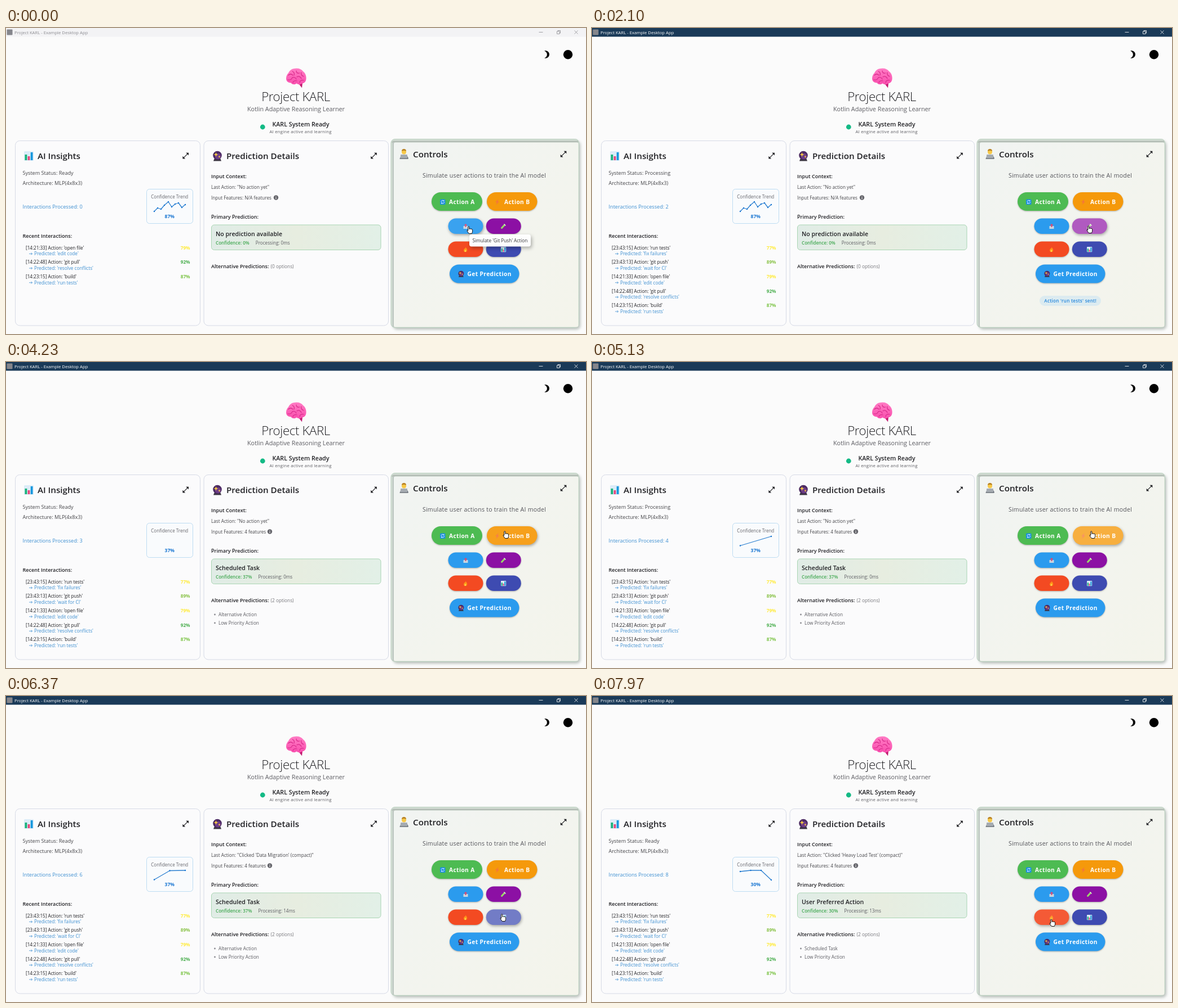
Recreate the animation shown at these times as an HTML page. Size 1029 by 544 pixels, loop 8000 ms.

```html
<!DOCTYPE html>
<html lang="en">
<head>
<meta charset="utf-8">
<title>Project KARL</title>
<style>
html, body { margin: 0; width: 100%; height: 100%; overflow: hidden; background: #fbfbfb; }
svg { display: block; width: 100vw; height: 100vh; }
text { font-family: "Open Sans", "Noto Sans", sans-serif; white-space: pre; }
</style>
</head>
<body>
<svg id="stage" viewBox="0 0 1029 544">
  <defs>
    <linearGradient id="predictionFill">
      <stop offset="0" stop-color="#e0ece6"/><stop offset=".5" stop-color="#e7ede0"/><stop offset="1" stop-color="#e2f0e7"/>
    </linearGradient>
    <linearGradient id="controlsFill" x2="1" y2="1">
      <stop offset="0" stop-color="#f1f4f2"/><stop offset="1" stop-color="#f4f4eb"/>
    </linearGradient>
    <linearGradient id="brainFill" x2="0" y2="1">
      <stop offset="0" stop-color="#ff7cc4"/><stop offset="1" stop-color="#f94fae"/>
    </linearGradient>
    <filter id="soft" x="-10%" y="-10%" width="120%" height="120%"><feGaussianBlur stdDeviation="2.5"/></filter>
    <path id="expand" transform="scale(.59) translate(-12 -12)" d="M21 11V3h-8l3.29 3.29-10 10L3 13v8h8l-3.29-3.29 10-10z"/>
    <g id="chart">
      <rect width="17" height="17" rx="1.5" fill="#dcecf8"/>
      <rect x="1.5" y="6" width="3.8" height="10" fill="#18b27a"/>
      <rect x="6.6" y="9" width="3.8" height="7" fill="#e5487d"/>
      <rect x="11.7" y="2" width="3.8" height="14" fill="#1497dd"/>
    </g>
    <g id="orb">
      <path d="M3 14h11l1.5 4h-14z" fill="#3a3440"/>
      <circle cx="8.5" cy="8" r="7.8" fill="#4b2a63"/>
      <circle cx="9.5" cy="9.5" r="5.2" fill="#6d3c86"/>
      <path d="M6 2.500l1 3 3 1-3 1-1 3-1-3-3-1 3-1zM12 8l.6 1.700 1.700.6-1.700.6-.6 1.700-.6-1.700-1.700-.6 1.700-.6z" fill="#ffd33d"/>
    </g>
  </defs>
</svg>
<script>
const LOOP = 8000;
const stage = document.getElementById('stage');

function add(tag, attrs, parent = stage) {
  const node = document.createElementNS('http://www.w3.org/2000/svg', tag);
  for (const key in attrs) node.setAttribute(key, attrs[key]);
  return parent.appendChild(node);
}
function label(x, y, content, size, fill = '#454549', weight = 400, extra = {}, parent = stage) {
  const node = add('text', { x, y, 'font-size': size, fill, 'font-weight': weight, ...extra }, parent);
  node.textContent = content;
  return node;
}
const box = (x, y, width, height, rx, fill, extra = {}, parent = stage) =>
  add('rect', { x, y, width, height, rx, fill, ...extra }, parent);
const path = (d, fill, extra = {}, parent = stage) => add('path', { d, fill, ...extra }, parent);
const use = (id, x, y, scale = 1, parent = stage) =>
  add('use', { href: '#' + id, transform: `translate(${x} ${y}) scale(${scale})` }, parent);
const span = (parent, dx, fill, weight) => add('tspan', { dx, fill, 'font-weight': weight }, parent);
const set = (node, value) => { if (node.textContent !== value) node.textContent = value; };
const show = (node, on) => node.setAttribute('visibility', on ? 'visible' : 'hidden');

const INK = '#202024', BLUE = '#3d8fd1';

// Window frame
box(0, 0, 1029, 544, 0, '#fbfbfb');
const bar = box(0, 0, 1029, 15.5, 0, '#f3f3f5');
box(1.5, 2.5, 10, 10, 1, '#85868c');
const windowTitle = label(15, 10.6, 'Project KARL - Example Desktop App', 7.7);
const windowButtons = path('M945.5 7.500h7M977.500 6h4.500v4.500h-4.500zM979 6v-1.500h4.500v4.500h-1.500M1008.500 4.500l6 6M1014.500 4.500l-6 6',
  'none', { 'stroke-width': .8 });

// Header
path('M9 2c-1.050 0-2.050.16-3 .46 4.060 1.270 7 5.060 7 9.540 0 4.480-2.940 8.270-7 9.540.95.3 1.950.46 3 .46 5.520 0 10-4.480 10-10S14.520 2 9 2z',
  '#000', { transform: 'translate(951.200 39) scale(.67)' });
add('circle', { cx: 997, cy: 47.3, r: 8.2, fill: '#000' });
path('M517 96l8 10.500 1-9z', '#c2186f');
path('M497 90c0-5 2-8 4-10 2-5 7-8 12-8 6-1 11 1 14 5 4 3 6 8 5.500 13 0 5-3 8-7 8.500-3 3-8 2-10 0-3 3-8 2-10-1-5 0-8.500-3-8.500-7.500z', 'url(#brainFill)');
path('M501 84c3-3 6-2 8 0M508 77c3 1 4 4 3 7M515 76c0 4 3 5 6 4M524 79c-1 4 1 6 4 7M500 92c4 1 7-1 8-4 3-1 6 0 7 3M516 87c4-2 7 0 8 3M509 97c1-3 4-4 7-3M521 97c0-3 3-5 7-4',
  'none', { stroke: '#d92c8c', 'stroke-width': 1.2, 'stroke-linecap': 'round' });
const centered = { 'text-anchor': 'middle' };
label(514, 130, 'Project KARL', 22.3, INK, 300, { ...centered, 'letter-spacing': -.4 });
label(514.5, 147.8, 'Kotlin Adaptive Reasoning Learner', 10.8, '#5c5c62', 400, centered);
add('circle', { cx: 455.3, cy: 176, r: 4.4, fill: '#14ba85' });
label(523, 174.5, 'KARL System Ready', 10.7, INK, 600, centered);
label(467.5, 187.2, 'AI engine active and learning', 7.7, '#5c5c62', 400, { 'letter-spacing': .25 });

// Panels
const panelBorder = { stroke: '#d6dae6', 'stroke-width': 1 };
box(16.5, 200.5, 328, 328.5, 8, '#fbfbfc', panelBorder);
box(351, 200.5, 327.5, 328.5, 8, '#fbfbfc', panelBorder);
box(687, 201, 332, 335, 7, '#8d9a91', { filter: 'url(#soft)', opacity: .6 });
box(683, 197.500, 333.5, 335, 7, '#d3ddd4', { stroke: '#b9cfbe', 'stroke-width': 1 });
path('M686 204q0-2 2-2h327', 'none', { stroke: '#b3bdb5', 'stroke-width': 3 });
path('M687 203v328', 'none', { stroke: '#bcc6c0', 'stroke-width': 2.5 });
box(688, 203.5, 327.500, 328, 3, 'url(#controlsFill)');

function heading(x, y, title, expandX) {
  label(x, y, title, 15.2, INK, 600);
  const icon = use('expand', expandX, y - 5.700);
  icon.setAttribute('fill', INK);
}
use('chart', 32, 219);
heading(56, 232.8, 'AI Insights', 318.7);
use('orb', 366.500, 218.500);
heading(391, 232.8, 'Prediction Details', 652.5);
heading(722, 229.8, 'Controls', 989);
// Person at a laptop
path('M699 232q1-7 7-7t8 7z', '#6d7480');
add('circle', { cx: 706, cy: 220.5, r: 4, fill: '#f7c948' });
path('M702 219q0-4 4-4t4 4q-4-2-8 0z', '#b98324');
box(700, 225, 12, 7, 1, '#a5abb1');
box(698.500, 231.5, 15, 1.500, .5, '#747a80');

// Insights
const status = label(29.5, 261.2, '', 9.1);
label(29.5, 278.8, 'Architecture: MLP(4x8x3)', 9.15);
const counter = label(29.5, 321.2, '', 9.15, BLUE);
box(249.5, 286.5, 82, 61, 5, '#f9fbfd', { stroke: '#bddcf2', 'stroke-width': 1 });
label(290.3, 302.7, 'Confidence Trend', 8.05, '#66666c', 400, centered);
const trend = path('', 'none', { stroke: '#2a7fd0', 'stroke-width': 1.3, 'stroke-linejoin': 'round' });
const trendDots = path('', 'none', { stroke: '#1976d2', 'stroke-width': 2.5, 'stroke-linecap': 'round' });
const trendValue = label(290.3, 338, '', 8.5, '#1976d2', 700, centered);
label(29.5, 372.7, 'Recent Interactions:', 9.1, INK, 600);

const history = [
  ['23:43:15', 'run tests', 'fix failures', 77, '#ffeb3b'],
  ['23:43:13', 'git push', 'wait for CI', 89, '#8bc34a'],
  ['14:21:33', 'open file', 'edit code', 79, '#ffeb3b'],
  ['14:22:48', 'git pull', 'resolve conflicts', 92, '#4caf50'],
  ['14:23:15', 'build', 'run tests', 87, '#7dc447']
].map(([time, action, guess, percent, color]) => {
  const row = add('g', {});
  label(35, 0, `[${time}] Action: '${action}'`, 8.1, INK, 500, {}, row);
  path('M41 7.800h5.500m-2-2l2 2-2 2', 'none', { stroke: BLUE, 'stroke-width': .8 }, row);
  label(50, 10.7, `Predicted: '${guess}'`, 8.2, BLUE, 400, {}, row);
  label(326.5, 0, percent + '%', 8.2, color, 700, { 'text-anchor': 'end' }, row);
  return row;
});

// Prediction
label(364, 266.500, 'Input Context:', 9.1, INK, 600);
const lastAction = label(364, 286, '', 8.2);
const features = label(364, 304.700, '', 8.15);
const info = add('g', {});
add('circle', { r: 4.200, fill: '#66666c' }, info);
path('M0-2.500v1M0-.5v3', 'none', { stroke: '#fff', 'stroke-width': 1 }, info);
label(364, 338.8, 'Primary Prediction:', 9.05, INK, 600);
box(364.5, 350, 300.5, 44.5, 5, 'url(#predictionFill)', { stroke: '#a9d5b3', 'stroke-width': 1 });
const primary = label(372, 370, '', 10.600, INK, 600);
const metrics = label(372, 385.2, '', 8.1);
const confidence = span(metrics, 0, '#43a953', 600);
const duration = span(metrics, 11, '#5c5c62', 400);
const alternatives = label(364, 427.2, '', 9.1, INK, 600);
span(alternatives, 0, INK, 600).textContent = 'Alternative Predictions:';
const optionCount = span(alternatives, 3, '#77777c', 400);
optionCount.setAttribute('font-size', 8.3);
const options = add('g', {});
for (const y of [449, 464]) add('circle', { cx: 370.500, cy: y, r: 1.400, fill: '#8a8a90' }, options);
const firstOption = label(377, 452, '', 8.25, '#5c5c62', 400, {}, options);
label(377, 467, 'Low Priority Action', 8.25, '#5c5c62', 400, {}, options);

// Controls
label(848.5, 266, 'Simulate user actions to train the AI model', 10.6, '#55555b', 400, { ...centered, 'letter-spacing': .22 });

const buttons = {};
function button(name, x, y, w, h, color, caption, textX, drawIcon) {
  const group = add('g', {});
  const base = box(x, y, w, h, h / 2, color, {}, group);
  drawIcon(group);
  if (caption) label(textX, y + h / 2 + 4, caption, 10.2, '#fff', 700, { 'letter-spacing': .4 }, group);
  const glow = box(x, y, w, h, h / 2, '#fff', {}, group);
  buttons[name] = { x, y, w, h, base, glow };
}
button('a', 755, 292, 90, 33, '#4dbb52', 'Action A', 786, g => {
  box(770, 304.500, 9.5, 9.5, 1.500, '#1a8fe0', {}, g);
  path('M772 309a2.800 2.800 0 0 1 5-1.300v-1.500m0 1.500h-1.500M777.500 309.500a2.800 2.800 0 0 1-5 1.300v1.500m0-1.500h1.500', 'none', { stroke: '#fff', 'stroke-width': .9 }, g);
});
button('b', 853, 292, 89.5, 33, '#f5990b', 'Action B', 884, g =>
  path('M874 304l-6 5.500h3l-2 5 6-6h-3z', '#f4753c', {}, g));
button('push', 784.5, 338.5, 62, 27.5, '#2b9bee', '', 0, g => {
  path('M811.500 352h8v5h-8z', '#c9d6e0', {}, g);
  path('M815.500 348l3 3h-2v3h-2v-3h-2z', '#e0476e', {}, g);
});
button('test', 851.8, 338.5, 62, 27.5, '#8c10a4', '', 0, g => {
  path('M879.500 355.500l5-5.500', 'none', { stroke: '#9bd86a', 'stroke-width': 3, 'stroke-linecap': 'round' }, g);
  path('M883.500 348.500l3 3', 'none', { stroke: '#e3e8e8', 'stroke-width': 1.200 }, g);
});
button('load', 784.5, 379.5, 62, 27.500, '#f34a22', '', 0, g => {
  path('M815 389.500c3 3 3.500 4.500 3 6.500-1 3-5 3-6 0-.5-2 1-2.500 1.500-4 1 .5 2-1 1.500-2.500z', '#ff9417', {}, g);
  path('M815 394c2 2 1.500 4-.2 4-1.800 0-1.500-2 .2-4z', '#ffd54a', {}, g);
});
button('data', 851.8, 379.5, 62, 27.500, '#3e4bb1', '', 0, g => use('chart', 878, 389, .54, g));
button('predict', 787, 420.5, 123.5, 33, '#2b9bee', 'Get Prediction', 818.5, g => use('orb', 802, 431.500, .63, g));

const toast = add('g', {});
const toastPill = box(794, 476, 109, 18, 9, '#dcebf0', {}, toast);
const toastText = label(848.7, 488, '', 8.1, '#2386dc', 600, { ...centered, 'letter-spacing': .25 }, toast);

const tooltip = add('g', { style: 'filter:drop-shadow(2px 3px 3px rgba(0,0,0,.3))' });
box(822, 367, 109, 21.5, 4, '#fdfdfd', {}, tooltip);
label(827.5, 380.800, "Simulate 'Git Push' Action", 8.25, '#38383c', 400, {}, tooltip);

const hand = path('M-2.300-5.500q1.300-1.500 2.200 0v4l1.500-.6 1.400.5 1.300-.1q1.700.4 1.500 2v3l-1.300 3.200h-5l-3-4.300q-.8-1.600.5-1.800l1 .9z',
  '#fff', { stroke: '#111', 'stroke-width': 1, 'stroke-linejoin': 'round' });

// Each entry overrides the values before it.
const timeline = [
  [0, { active: false, status: 'Ready', count: 0, added: 0, toast: '', features: 'N/A', infoX: 479, last: 'No action yet',
    primary: 'No prediction available', conf: 0, ms: 0, option: '', trend: 87,
    points: [263, 326, 269, 320, 275, 322, 281, 315, 288, 309, 294, 318, 300, 313, 306, 311, 312, 319, 318, 314] }],
  [350, { active: true, status: 'Processing', count: 1, added: 1, toast: 'git push' }],
  [1750, { count: 2, added: 2, toast: 'run tests' }],
  [2700, { toast: '' }],
  [3200, { count: 3 }],
  [3450, { status: 'Ready', features: '4', infoX: 468, primary: 'Scheduled Task', conf: 37, trend: 37,
    option: 'Alternative Action', points: [] }],
  [5030, { status: 'Processing', count: 4, points: [263, 326.5, 318, 310] }],
  [5350, { status: 'Ready' }],
  [6230, { count: 6, last: "Clicked 'Data Migration' (compact)", ms: 14, points: [263, 326.5, 290.5, 310.5, 318, 310] }],
  [7500, { count: 8, last: "Clicked 'Heavy Load Test' (compact)", ms: 13, primary: 'User Preferred Action', conf: 30, trend: 30,
    option: 'Scheduled Task', points: [263, 312, 281.5, 310, 300, 310, 318, 327] }]
];
const clicks = { push: 350, test: 1750, a: 3200, b: 5030, data: 6230, load: 7500 };
const cursorPath = [
  [0, 822, 359], [800, 822, 359], [1450, 882, 358], [2250, 882, 358], [2800, 809, 314], [3400, 809, 314],
  [4100, 886, 307], [5130, 887, 307], [5450, 887, 307], [6050, 881, 394], [6600, 881, 394], [7250, 816, 403], [8000, 816, 403]
];

function cursorAt(t) {
  const i = cursorPath.findIndex(([time]) => time > t);
  const [t0, x0, y0] = cursorPath[i - 1], [t1, x1, y1] = cursorPath[i];
  const p = (t - t0) / (t1 - t0), ease = p * p * (3 - 2 * p);
  return [x0 + (x1 - x0) * ease, y0 + (y1 - y0) * ease];
}
function ripple(age) {
  if (age < 0 || age > 480) return 0;
  return .24 * Math.min(1, age / 170, (480 - age) / 110);
}

function drawState(s) {
  bar.setAttribute('fill', s.active ? '#1a3a58' : '#f3f3f5');
  windowTitle.setAttribute('fill', s.active ? '#fff' : '#8b8b90');
  windowButtons.setAttribute('stroke', s.active ? '#fff' : '#8b8b90');
  set(status, 'System Status: ' + s.status);
  set(counter, 'Interactions Processed: ' + s.count);
  set(trendValue, s.trend + '%');
  let line = '', dots = '';
  for (let i = 0; i < s.points.length; i += 2) {
    const at = s.points[i] + ' ' + s.points[i + 1];
    line += (i ? 'L' : 'M') + at;
    dots += `M${at}h.01`;
  }
  trend.setAttribute('d', line);
  trendDots.setAttribute('d', dots);
  history.forEach((row, i) => {
    const slot = i - 2 + s.added;
    show(row, slot >= 0);
    row.setAttribute('transform', `translate(0 ${393.6 + slot * 25.65})`);
  });
  set(lastAction, `Last Action: "${s.last}"`);
  set(features, `Input Features: ${s.features} features`);
  info.setAttribute('transform', `translate(${s.infoX} 301.5)`);
  set(primary, s.primary);
  set(confidence, `Confidence: ${s.conf}%`);
  set(duration, `Processing: ${s.ms}ms`);
  set(optionCount, `(${s.option ? 2 : 0} options)`);
  show(options, s.option);
  set(firstOption, s.option);
  show(toast, s.toast);
  set(toastText, `Action '${s.toast}' sent!`);
  const width = s.toast === 'git push' ? 106 : 109;
  toastPill.setAttribute('width', width);
  toastPill.setAttribute('x', 848.5 - width / 2);
}

function render(t) {
  drawState(Object.assign({}, ...timeline.filter(([time]) => time <= t).map(([, change]) => change)));
  const [cx, cy] = cursorAt(t);
  hand.setAttribute('transform', `translate(${cx} ${cy})`);
  for (const name in buttons) {
    const b = buttons[name];
    const hovered = cx > b.x && cx < b.x + b.w && cy - 5 > b.y && cy - 5 < b.y + b.h;
    const press = ripple(t - clicks[name]) || 0;
    b.glow.setAttribute('opacity', (hovered ? .07 : 0) + press);
    b.base.style.filter = hovered
      ? 'drop-shadow(1.5px 2.5px 2.5px rgba(0,0,0,.34))'
      : 'drop-shadow(.7px 1.2px 1.2px rgba(0,0,0,.28))';
  }
  show(tooltip, t < 350);
}

function tick() {
  render(performance.now() % LOOP);
  requestAnimationFrame(tick);
}
tick();
</script>
</body>
</html>
```
